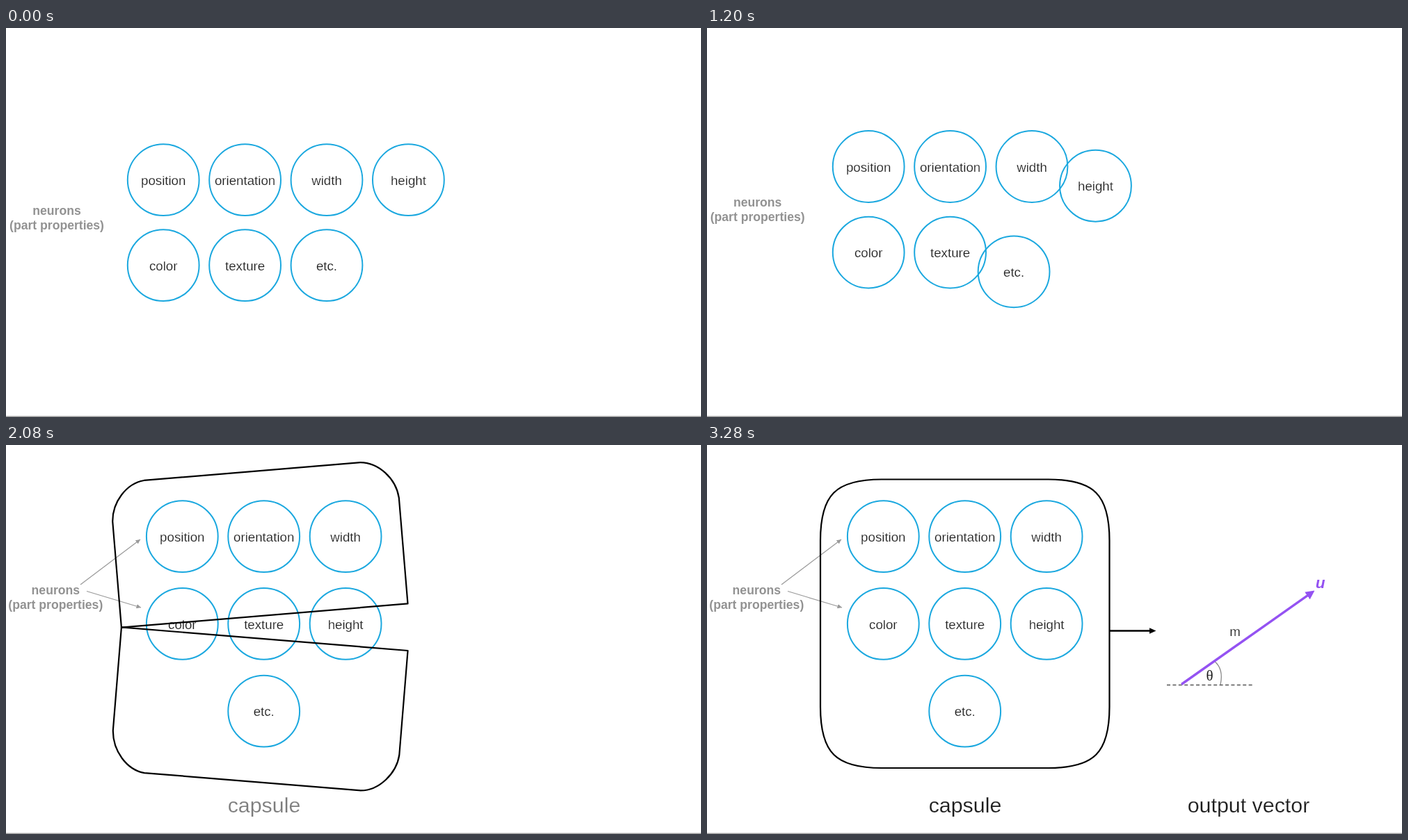
Recreate the animation shown at these times as an HTML page. Size 999 px wide and 560 px high, loop 3.36 s.

```html
<!DOCTYPE html>
<html lang="en">
<head>
<meta charset="utf-8">
<title>Capsule</title>
<style>
  html, body { margin: 0; width: 100%; height: 100%; overflow: hidden; background: #fff; }
  svg { display: block; width: 999px; height: 560px; }
  text { font-family: "Liberation Sans", Arial, sans-serif; text-anchor: middle; fill: #1c1c1c; }
  .thin { stroke: #fff; stroke-width: .25; }
  .neuron text, .m { font-size: 18.7px; }
  .neuron circle { fill: none; stroke: #1ba8df; stroke-width: 2; }
  .caption { font-size: 30.4px; }
  #label text { font-size: 17.6px; font-weight: bold; fill: #929292; }
  .outline { fill: none; stroke: #000; stroke-width: 2.2; stroke-linejoin: round; }
  .pointer { stroke: #999; stroke-width: 1.2; }
  .pointer + path { fill: #999; }
</style>
</head>
<body>
<svg viewBox="0 0 999 560">
  <defs>
    <marker id="grayTip" viewBox="0 0 6 6" refX="6" refY="3" markerWidth="6.5" markerHeight="6.5" markerUnits="userSpaceOnUse" orient="auto"><path d="M0 0L6 3L0 6z" fill="#999"/></marker>
    <marker id="blackTip" viewBox="0 0 10 9" refX="10" refY="4.5" markerWidth="10" markerHeight="9" markerUnits="userSpaceOnUse" orient="auto"><path d="M0 0L10 4.5L0 9z"/></marker>
    <marker id="violetTip" viewBox="0 0 13 13" refX="13" refY="6.5" markerWidth="13" markerHeight="13" markerUnits="userSpaceOnUse" orient="auto"><path d="M0 0L13 6.5L0 13z" fill="#9452f2"/></marker>
  </defs>

  <g id="neurons"></g>

  <g id="label">
    <text y="269">neurons</text>
    <text y="290">(part properties)</text>
  </g>
  <g id="pointers">
    <line class="pointer" x1="107" y1="201" x2="193" y2="136" marker-end="url(#grayTip)"/>
    <line class="pointer" x1="116" y1="210.5" x2="194" y2="234" marker-end="url(#grayTip)"/>
  </g>

  <g id="halves" class="outline">
    <path id="upper" d="M0 0V-153C2 -181 24 -206 50 -208.3H362C388 -206 411 -181 413 -153V0z"/>
    <path id="lower" d="M0 0V149C2 178 24 204 50 206.3H362C388 204 411 178 413 151V0z"/>
  </g>
  <path id="capsule" class="outline"/>
  <text id="name" class="caption thin" x="371" y="528.5">capsule</text>

  <g id="output">
    <line x1="579" y1="267.5" x2="636" y2="267.5" stroke="#000" stroke-width="2.3"/>
    <line x1="579" y1="267.5" x2="645.5" y2="267.5" marker-end="url(#blackTip)" stroke="none"/>
    <path d="M661 345.5H784" stroke="#555" stroke-width="1.7" stroke-dasharray="5 3.4"/>
    <path d="M729 311Q743 322 738 345" fill="none" stroke="#888" stroke-width="1.3"/>
    <line x1="682" y1="344.5" x2="864" y2="216.2" stroke="#9452f2" stroke-width="3.4"/>
    <line x1="682" y1="344.5" x2="873.5" y2="209.5" marker-end="url(#violetTip)" stroke="none"/>
    <text x="881.5" y="206" style="font: italic bold 22.5px 'Liberation Sans', Arial, sans-serif; fill: #9452f2">u</text>
    <text class="m thin" x="759" y="274.5">m</text>
    <text x="722.5" y="339" style="font: 21px 'Liberation Serif', 'Times New Roman', serif">θ</text>
    <text class="caption thin" x="778.5" y="528.5">output vector</text>
  </g>
  <rect y="558.7" width="999" height="1" fill="#777"/>
</svg>

<script>
const LOOP = 3360, STEP = 80;
const $ = id => document.getElementById(id);
const mix = (a, b, p) => a + (b - a) * p;
const ramp = (t, from, to) => Math.min(1, Math.max(0, (t - from) / (to - from)));
const ease = p => (1 - Math.cos(Math.PI * p)) / 2;
const sigmoid = (t, mid, width) => 1 / (1 + Math.exp((mid - t) / width));

// word, start column and row, end column and row
const neurons = [
  ["position", 0, 0, 0, 0], ["orientation", 1, 0, 1, 0],
  ["width", 2, 0, 2, 0], ["height", 3, 0, 2, 1],
  ["color", 0, 1, 0, 1], ["texture", 1, 1, 1, 1], ["etc.", 2, 1, 1, 2]
].map(([word, c0, r0, c1, r1]) => {
  const g = document.createElementNS("http://www.w3.org/2000/svg", "g");
  g.setAttribute("class", "neuron");
  g.innerHTML = `<circle r="51.4"/><text class="thin" y="7.2">${word}</text>`;
  $("neurons").append(g);
  return {
    g,
    from: [226.2 + 117.4 * c0, 218.7 + 122.9 * r0],
    to: [253.3 + 117.4 * c1, 131.6 + 125.8 * r1]
  };
});

function roundedBox(x, y, w, h, e, k) {
  const c = e * k, s = e - c;
  return `M${x + e} ${y}h${w - 2 * e}c${c} 0 ${e} ${s} ${e} ${e}v${h - 2 * e}` +
    `c0 ${c} ${-s} ${e} ${-e} ${e}h${2 * e - w}c${-c} 0 ${-e} ${-s} ${-e} ${-e}` +
    `v${2 * e - h}c0 ${-c} ${s} ${-e} ${e} ${-e}z`;
}
$("capsule").setAttribute("d", roundedBox(163, 49.5, 415.5, 415.5, 88, .75));

function place(el, x, y, angle = 0) {
  el.setAttribute("transform", `translate(${x} ${y}) rotate(${angle})`);
}

function draw(t) {
  const move = sigmoid(t, 1277, 61);
  for (const { g, from, to } of neurons)
    place(g, mix(from[0], to[0], move), mix(from[1], to[1], move));
  place($("label"), mix(73, 71.3, move), mix(0, -54, move));

  const appear = ramp(t, 1310, 1640);
  const swap = ramp(t, 2360, 2640);
  $("pointers").style.opacity = appear;
  $("halves").style.opacity = appear * (1 - swap);
  $("capsule").style.opacity = swap;

  const shut = ease(ramp(t, 1860, 2282));
  place($("upper"), mix(167, 165, shut), mix(266, 259.8, shut), mix(-10.2, 0, shut));
  place($("lower"), mix(167, 165, shut), mix(266.5, 258.8, shut), mix(10, 0, shut));

  $("name").style.opacity = ramp(t, 1920, 2200);
  $("output").style.opacity = ramp(t, 2740, 3100);
}

const start = performance.now();
function tick() {
  const t = (performance.now() - start) % LOOP;
  draw(Math.floor(t / STEP) * STEP);
  requestAnimationFrame(tick);
}
tick();
</script>
</body>
</html>
```
